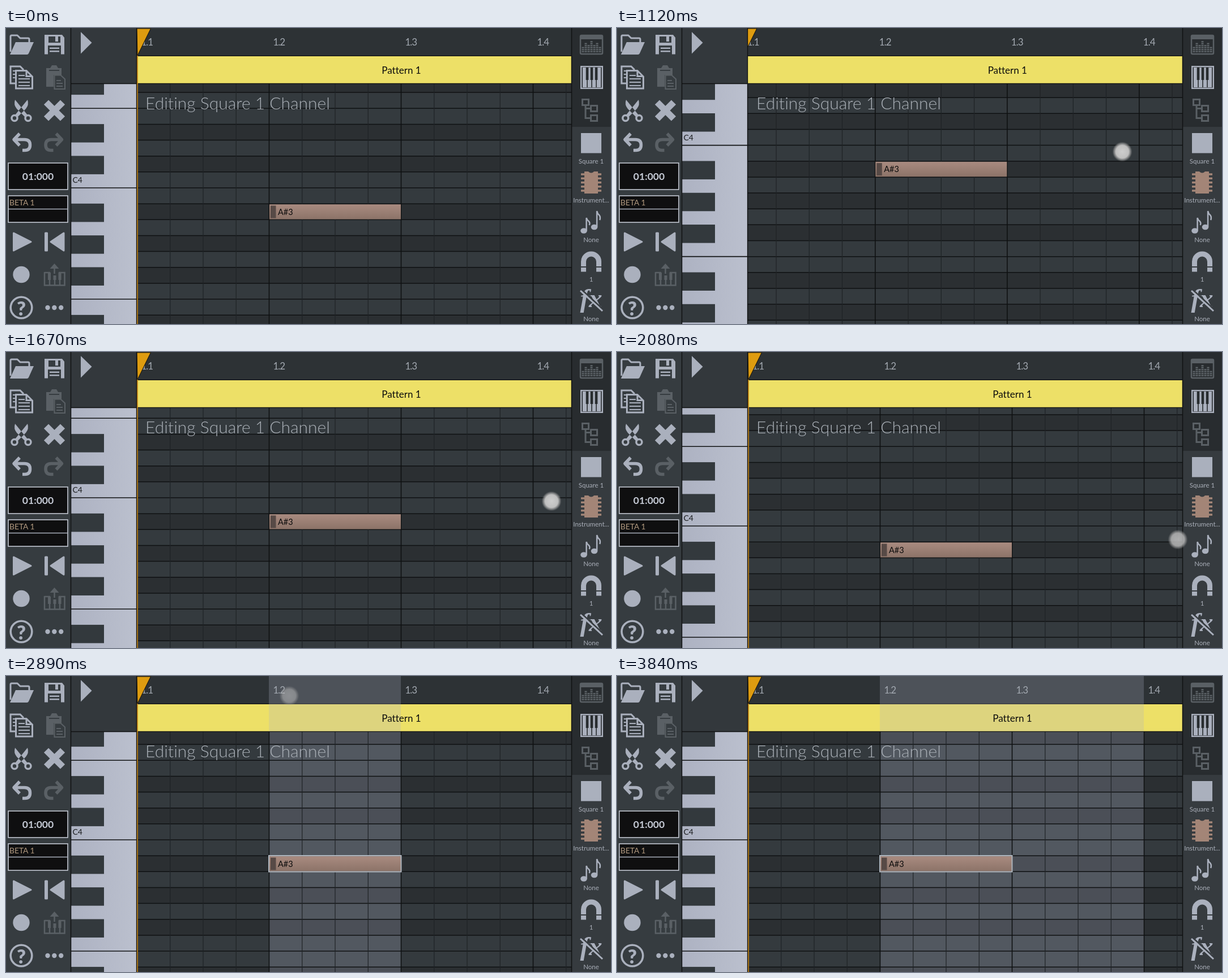
Write an HTML page that moves like this. It is 1068 px wide and 524 px high and loops after 5360 ms.

```html
<!DOCTYPE html>
<html lang="en">
<head>
<meta charset="utf-8">
<title>Piano roll</title>
<style>
  html, body { margin: 0; height: 100%; overflow: hidden; background: #34393d; }
  svg { display: block; }
  text { font-family: Lato, "Open Sans", sans-serif; font-variant-ligatures: none; dominant-baseline: central; }
  .on { fill: #aab0bd; }
  .off { fill: #5a6065; }
  .line { fill: none; stroke: #aab0bd; }
  .line.off { stroke: #5a6065; }
  .round { stroke: #aab0bd; stroke-linejoin: round; }
  .label { fill: #a9aeb8; font-size: 11.5px; text-anchor: middle; }
  .mark { fill: #a3a9b1; font-size: 17px; letter-spacing: -1px; }
  .box { fill: #0f0f10; stroke: #c3c8d2; stroke-width: 1.6; }
  .selection { fill: #adb1c2; opacity: .25; }
</style>
</head>
<body>
<svg width="100%" height="100%" viewBox="0 0 1068 524" stroke-width="3">
  <defs>
    <linearGradient id="noteFill" x2="0" y2="1">
      <stop stop-color="#a98b80"/><stop offset="1" stop-color="#8c7368"/>
    </linearGradient>
    <linearGradient id="ivory">
      <stop stop-color="#adb2c2"/><stop offset="1" stop-color="#bbc0ce"/>
    </linearGradient>
    <radialGradient id="touch">
      <stop stop-color="#cdcdcd"/><stop offset=".65" stop-color="#bfbfbf"/>
      <stop offset=".8" stop-color="#a8a8a8" stop-opacity=".7"/>
      <stop offset="1" stop-color="#999" stop-opacity="0"/>
    </radialGradient>
  </defs>

  <!-- note grid -->
  <svg x="231" y="99" width="767" height="425" viewBox="231 99 767 425">
    <g id="rows" class="scrollY"></g>
    <rect class="selection" x="464" y="99" height="425"/>
    <g id="rowLines" class="scrollY" stroke="#0f1112" stroke-width="1.5"></g>
    <g id="beats" class="scrollX"></g>
    <g class="scrollX"><g class="scrollY">
      <rect x="465" y="29.2" width="232" height="26.4" fill="url(#noteFill)"/>
      <rect x="467" y="31.5" width="9.5" height="22" fill="#574a46"/>
      <text x="480" y="42" font-size="14.5" fill="#0c0c0c">A#3</text>
      <rect id="outline" x="464" y="28" width="233.5" height="28.5" fill="none" stroke="#aeb5bd" stroke-width="2"/>
    </g></g>
    <text x="246" y="131.5" font-size="30" font-weight="300" fill="#a9afb6">Editing Square 1 Channel</text>
  </svg>

  <!-- timeline -->
  <svg x="231" width="767" height="99" viewBox="231 0 767 99">
    <rect x="231" width="767" height="99" fill="#2d3235"/>
    <rect x="231" y="50" width="767" height="48" fill="#ede067"/>
    <path d="M231 49.3h767M231 98.5h767" stroke="#101213" stroke-width="1.3"/>
    <rect class="selection" x="464" height="98"/>
    <g id="marks" class="scrollX">
      <text x="698" y="74" font-size="17" text-anchor="middle" fill="#0c0c0c">Pattern 1</text>
    </g>
  </svg>
  <svg x="231" width="767" height="524" viewBox="231 0 767 524">
    <g class="scrollX">
      <path d="M232 48V524" stroke="#c2861a" stroke-width="1.8"/>
      <path d="M231 1h24.5L232 49z" fill="#de9c10" stroke="#15120a" stroke-width="1"/>
    </g>
  </svg>

  <!-- keyboard -->
  <rect x="115" width="116" height="99" fill="#33383c"/>
  <path class="on" d="M132 7l19.5 19L132 45.5z"/>
  <svg x="115" y="99" width="116" height="425" viewBox="115 99 116 425">
    <rect x="115" y="99" width="116" height="425" fill="url(#ivory)"/>
    <g id="keys" class="scrollY"><text x="117.5" y="-14.5" font-size="14" fill="#1c1e20">C4</text></g>
  </svg>
  <path d="M115 98.5h116M230.5 0V524" stroke="#101213" stroke-width="1.3"/>

  <!-- left tools -->
  <rect width="114" height="524" fill="#363c40"/>
  <path d="M114.5 0V524" stroke="#101213" stroke-width="1.5"/>
  <path class="line" stroke-linejoin="round" d="M8 42V15q0-2 2-2h10l5 5h14q2 0 2 2v5"/>
  <path class="on" d="M17 25h32l-9 20q-1 2-3 2H7z"/>
  <path class="on" fill-rule="evenodd" d="M68 12h31l4 5v29.5H68zM75 15v11h21V15zM74 31v15.5h23V31z"/>
  <path class="on" d="M87 15h5v9h-5zM77 34.5h17V37H77zM77 40h17v2.5H77z"/>
  <path class="line" d="M16 98H8V68h17l6 6M17.5 75.5H36L46.5 86V107h-29zM36 75v10.5h10"/>
  <path class="line" stroke-width="2" d="M12 76h4M12 82h4M12 88h4M22 84h11M22 90h20M22 96h20M22 102h20"/>
  <path class="off" d="M71 71h7l3-5h8l3 5h6v12H84v21H71z"/>
  <path class="line off" stroke-width="2" d="M85.5 83.5h11l7.5 7V108H85.5zM89 93h8M89 98h11M89 103h11"/>
  <path d="M76 75h18" stroke="#363c40" stroke-width="2"/>
  <g class="line" stroke-width="3.5"><circle cx="15" cy="159.5" r="5"/><circle cx="39" cy="159.5" r="5"/></g>
  <path class="on" d="M16 127q-3 9 3 16l15 15 4-4zM38 127q3 9-3 16l-15 15-4-4z"/>
  <path class="line" stroke-width="11.5" d="M71 131.5l29 29M100 131.5l-29 29"/>
  <g class="line" stroke-width="5.5" stroke-linejoin="round">
    <path id="turn" d="M24 187L14 197.5 24 208M14 197.5h18.5q10 0 10 9.500t-9 9.5H29"/>
    <use href="#turn" transform="matrix(-1 0 0 1 112.5 0)" stroke="#5a6065"/>
  </g>
  <rect class="box" x="4" y="239" width="105" height="47"/>
  <text x="56.5" y="262" font-size="17.5" font-weight="700" text-anchor="middle" fill="#c6cbd6">01:000</text>
  <rect class="box" x="4" y="297" width="105" height="47"/>
  <path class="line" stroke-width="1.5" d="M4 320.5h105"/>
  <text x="6" y="308" font-size="13.8" fill="#b39b80">BETA 1</text>
  <path class="on round" d="M13.500 363l30.5 15.5L13.500 394zM102 363v31L79 378.5zM69.500 363h3v31h-3z"/>
  <circle class="on" cx="27" cy="436.5" r="14.7"/>
  <path class="line off" stroke-width="2.5" d="M68 433h10M93 433h10.5v22.5H68V432M77 445v10M86 445v10M95 445v10M85.5 421v14"/>
  <path class="off" d="M85.5 417l8 9h-16zM74 433h5v13h-5zM83.5 438h5v8h-5zM92.5 433h5v13h-5z"/>
  <circle class="line" cx="27" cy="495" r="18.8" stroke-width="3.6"/>
  <text class="on" x="27" y="495" font-size="34" font-weight="900" text-anchor="middle">?</text>
  <g class="on"><circle cx="73.5" cy="495" r="4.2"/><circle cx="85.3" cy="495" r="4.2"/><circle cx="97.2" cy="495" r="4.2"/></g>

  <!-- right tools -->
  <rect x="999" width="69" height="524" fill="#363b3f"/>
  <rect x="999" width="69" height="175" fill="#282c2f"/>
  <path d="M998.5 0V524" stroke="#101213" stroke-width="1.5"/>
  <rect class="line off" x="1014" y="13" width="39" height="33" rx="2" stroke-width="2.5"/>
  <path class="off" d="M1014 13h39v7h-39z"/>
  <g id="meter" class="line off" stroke-width="4" stroke-dasharray="2.5 1"></g>
  <rect class="line" x="1015.2" y="68.2" width="37.6" height="38.6" stroke-width="2.4"/>
  <path class="on" d="M1018 70h32v35h-32z"/>
  <path d="M1026 70v35M1034 70v35M1042 70v35" stroke="#282c2f" stroke-width="1.6"/>
  <path d="M1026 70v22M1034 70v22M1042 70v22" stroke="#282c2f" stroke-width="4.6"/>
  <path class="line off" d="M1017.5 126.5h11v10h-11zM1032.5 137.5h11v10h-11zM1032.5 154.5h11v10h-11zM1023 137v22.5h9M1023 142.5h9"/>
  <path class="on" d="M1015 186h36v35.5h-36z"/>
  <path fill="#a38577" d="M1021 254h7q5 5 10 0h7v39h-24z"/>
  <path stroke="#a38577" stroke-width="3.5" d="M1015 259h36M1015 266.3h36M1015 273.5h36M1015 280.8h36M1015 288h36"/>
  <g class="on">
    <ellipse cx="1020" cy="359" rx="5.8" ry="4.8"/><ellipse cx="1038.5" cy="352.5" rx="5.8" ry="4.8"/>
  </g>
  <path class="line" stroke-width="2.5" d="M1024.6 359V336q1 4 4 6 3 3 1 7M1043.1 352V324q1 5 4 7 3 4 1 9"/>
  <path class="line" stroke-width="9" d="M1019.5 431.5v-18a13.5 13.5 0 0 1 27 0v18"/>
  <path d="M1014 423h11M1041 423h11" stroke="#363b3f" stroke-width="2"/>
  <text class="on" x="1033" y="494" font-size="47" font-weight="700" font-style="italic" text-anchor="middle" style="font-family:'Liberation Serif',serif;dominant-baseline:alphabetic">fx</text>
  <path d="M1016 463l39 36" stroke="#363b3f" stroke-width="2.5"/>
  <path class="line" d="M1014 465l39 36"/>
  <g class="label">
    <text x="1033" y="235">Square 1</text><text x="1033" y="304.5">Instrument...</text>
    <text x="1033" y="374.5">None</text><text x="1033" y="444">1</text><text x="1033" y="514">None</text>
  </g>

  <circle id="pointer" r="17.5" fill="url(#touch)"/>
</svg>

<script>
const LOOP = 5360, START = 640, STEP = 68;
const ROW = 28.15, BEAT = 233, ORIGIN = 231.5;
const byId = id => document.getElementById(id);
const all = selector => document.querySelectorAll(selector);

function add(parent, tag, attrs, text = "") {
  const el = document.createElementNS("http://www.w3.org/2000/svg", tag);
  for (const name in attrs) el.setAttribute(name, attrs[name]);
  el.textContent = text;
  byId(parent).append(el);
}

// Row 0 is B3, directly below the C4 row
for (let row = -9; row <= 12; row++) {
  const y = row * ROW, pitch = (23 - row) % 12;
  const black = [1, 3, 6, 8, 10].includes(pitch);
  add("rows", "rect", { x: 231, y, width: 767, height: ROW + .5, fill: black ? "#2b2f32" : "#343a3e" });
  add("rowLines", "path", { d: `M231 ${y}h767` });
  if (black) add("keys", "rect", { x: 115, y: y - .3, width: 58, height: 32.5, fill: "#33393d" });
  if (pitch === 11 || pitch === 4) add("keys", "path", { d: `M115 ${y}h116`, stroke: "#101213", "stroke-width": 1.6 });
}

for (let i = 0; i < 15; i++) {
  const whole = i % 4 === 0;
  add("beats", "path", {
    d: `M${ORIGIN + i * BEAT / 4} 99V524`,
    stroke: whole ? "#0f1112" : "#1f2326", "stroke-width": whole ? 1.6 : 1.2
  });
}
for (let i = 0; i < 4; i++)
  add("marks", "text", { class: "mark", x: 238.5 + i * BEAT, y: 24.5 }, `1.${i + 1}`);

[10, 17, 13, 20, 13, 17, 10].forEach((h, i) =>
  add("meter", "path", { d: `M${1018.5 + i * 5} 43v${-h}` }));

// Keys are [step, value], eased between neighbours
function track(keys, s) {
  const i = keys.findIndex(key => key[0] > s);
  if (i === 0) return keys[0][1];
  if (i < 0) return keys.at(-1)[1];
  const [[s0, v0], [s1, v1]] = [keys[i - 1], keys[i]];
  const u = (s - s0) / (s1 - s0);
  return v0 + (v1 - v0) * u * u * (3 - 2 * u);
}

const scrollX = [[0, 0], [7, -8.7], [10, 0]];
const scrollY = [[0, 283], [7, 207.6], [15, 258], [16, 260], [18, 260], [20, 321], [21, 308], [25, 292], [29, 290]];
const pointerX = [[0, 901], [7, 892], [15, 963], [16, 966], [18, 966], [20, 990], [25, 990], [26, 500], [33, 500], [36, 752], [38, 752], [41, 785]];
const pointerY = [[0, 294], [7, 219], [15, 264], [16, 267], [18, 267], [20, 332], [25, 332], [26, 35]];
const pointerAlpha = [[-1, 0], [1, 1], [20, 1], [21, .8], [24, 0], [32, 0], [34, 1], [41, 1], [46, 0]];

function draw(now) {
  const s = Math.floor((now % LOOP - START) / STEP);
  const x = track(pointerX, s);
  all(".scrollX").forEach(el => el.setAttribute("transform", `translate(${track(scrollX, s)} 0)`));
  all(".scrollY").forEach(el => el.setAttribute("transform", `translate(0 ${track(scrollY, s)})`));

  const selected = s >= 33;
  const width = !selected ? 0 : x > ORIGIN + 2 * BEAT ? 2 * BEAT : BEAT;
  all(".selection").forEach(el => el.setAttribute("width", width));
  byId("outline").style.opacity = selected ? 1 : 0;

  const pointer = byId("pointer");
  pointer.setAttribute("transform", `translate(${x} ${track(pointerY, s)})`);
  pointer.style.opacity = track(pointerAlpha, s);
  requestAnimationFrame(draw);
}
requestAnimationFrame(draw);
</script>
</body>
</html>
```
